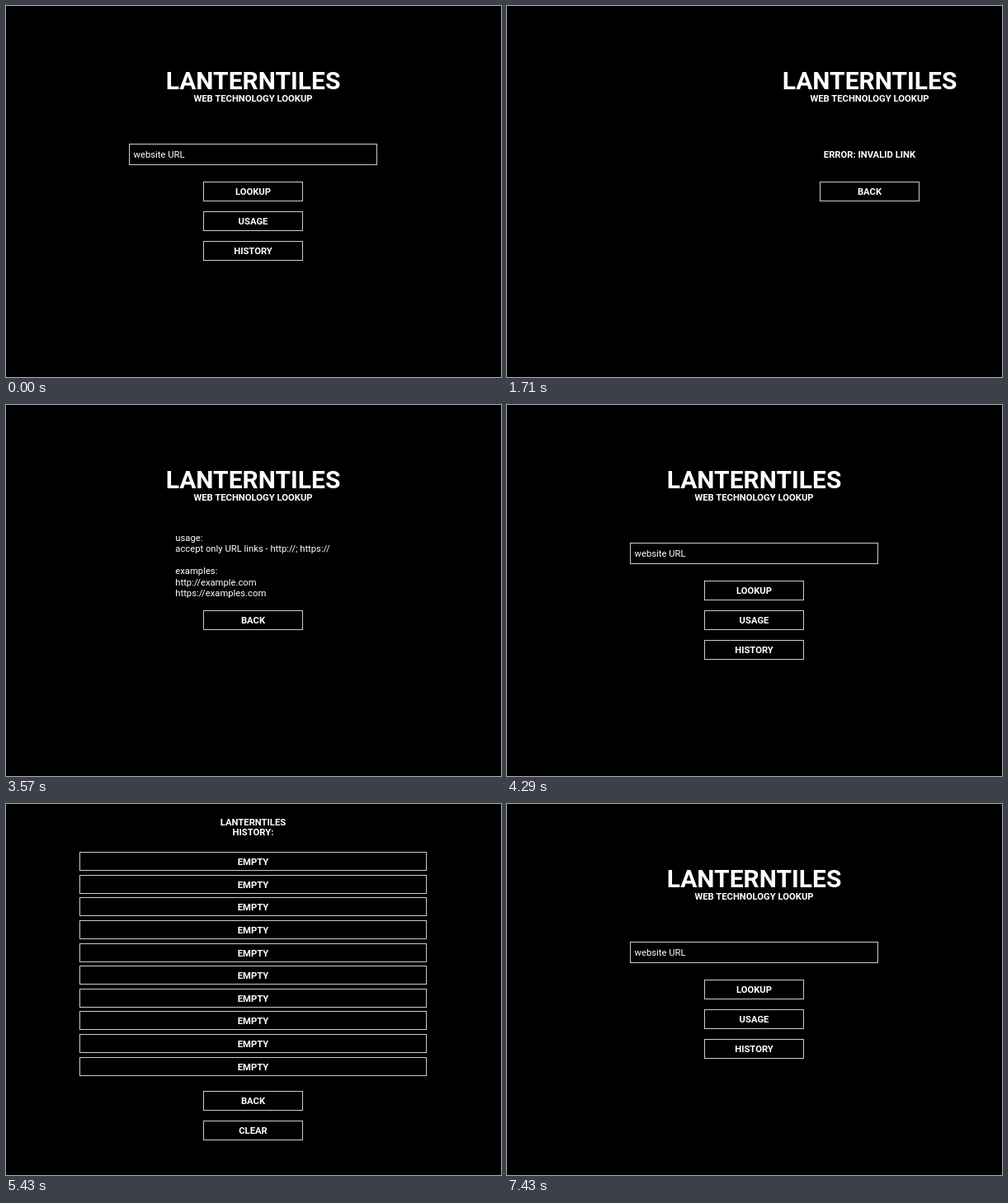
Recreate the animation shown at these times as an HTML page. Size 600x450 px, loop 8000 ms.

```html
<!DOCTYPE html>
<html lang="en">
<head>
<meta charset="utf-8">
<title>Web technology lookup</title>
<style>
  html, body { margin: 0; width: 100%; height: 100%; overflow: hidden; background: #000; }
  svg { display: block; width: 600px; height: 450px; }
  text { fill: #fff; font: 11.25px Roboto, sans-serif; white-space: pre; }
  .bold { font-weight: 700; text-anchor: middle; }
  .title { font-size: 30px; }
  rect { fill: none; stroke: #ccc; }
</style>
</head>
<body>
<svg id="stage" viewBox="0 0 600 450"></svg>
<script>
const LOOP = 8000, WIDTH = 600, SLIDE = 400, CENTER = 299.5, NAME = 'LANTERNTILES';

const bold = (y, s, cls = '') => `<text class="bold ${cls}" x="${CENTER}" y="${y}">${s}</text>`;
const plain = (x, y, s) => `<text x="${x}" y="${y}">${s}</text>`;
const box = (y, w, h) => `<rect x="${CENTER - w / 2}" y="${y + 0.5}" width="${w}" height="${h}"/>`;
const button = (y, s) => box(y, 120, 23) + bold(y + 16, s);

const header = bold(101, NAME, 'title') + bold(116.3, 'WEB TECHNOLOGY LOOKUP');
const usageLines = ['usage:', 'accept only URL links - http://; https://', '',
  'examples:', 'http://example.com', 'https://examples.com'];
const rows = Array.from({ length: 10 }, (_, i) => {
  const y = Math.round(58.1 + 27.6 * i);
  return box(y, 420, 22) + bold(y + 15.6, 'EMPTY');
});

const screens = {
  home: header + box(167, 300, 25) + plain(154.5, 184, 'website URL') +
    button(213, 'LOOKUP') + button(249, 'USAGE') + button(285, 'HISTORY'),
  wait: header,
  error: header + bold(184, 'ERROR: INVALID LINK') + button(213, 'BACK'),
  usage: header + usageLines.map((s, i) => plain(205.3, 164.5 + 13.5 * i, s)).join('') +
    button(249, 'BACK'),
  history: bold(26.3, NAME) + bold(37.5, 'HISTORY:') + rows.join('') +
    button(348, 'BACK') + button(384, 'CLEAR')
};

// Start of each slide and the screen that enters from the right
const slides = [
  [805, 'wait'], [1504, 'error'], [2208, 'home'], [2945, 'usage'],
  [3900, 'home'], [4831, 'history'], [7015, 'home']
];

const stage = document.getElementById('stage');
stage.innerHTML = Object.entries(screens).map(([id, s]) => `<g id="${id}">${s}</g>`).join('');

const easeOut = t => 1 - (1 - Math.min(t, 1)) ** 2;

function place(id, x) {
  const g = document.getElementById(id);
  g.style.display = Math.abs(x) < WIDTH ? '' : 'none';
  g.setAttribute('transform', `translate(${x})`);
}

function draw(now) {
  const t = now % LOOP;
  let from = 'wait', to = 'home', p = 1;
  for (const [start, next] of slides) {
    if (t < start) break;
    from = to;
    to = next;
    p = easeOut((t - start) / SLIDE);
  }
  for (const id in screens) place(id, WIDTH);
  const x = Math.round(WIDTH * (1 - p));
  place(from, x - WIDTH);
  place(to, x);
}

const begin = performance.now();
function tick() {
  draw(performance.now() - begin);
  requestAnimationFrame(tick);
}
tick();
</script>
</body>
</html>
```
